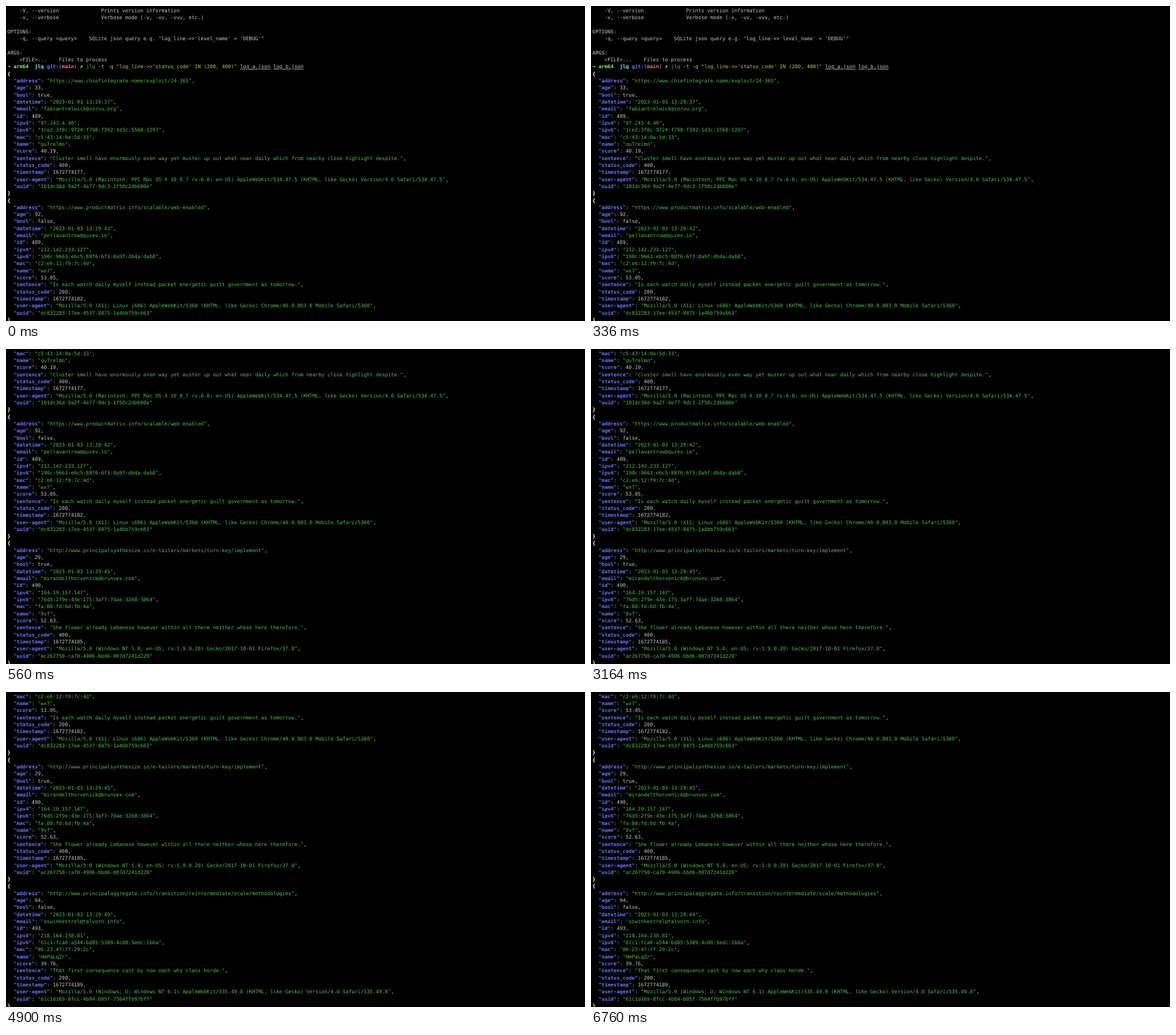
Animation of 1014 by 552 pixels, one loop 8 s. Source, as an HTML page:

```html
<!DOCTYPE html>
<html lang="en">
<meta charset="utf-8">
<title>jlq</title>
<style>
  html, body { margin: 0; width: 100%; height: 100%; overflow: hidden; background: #000; }
  svg { display: block; }
  text {
    font: 8.79px "DejaVu Sans Mono", monospace;
    text-rendering: geometricPrecision;
    white-space: pre;
    fill: #c9c9c9;
  }
  .key, .dir, .path, .branch, .brace, .mark { font-weight: bold; }
  .key { fill: #6e74fa; }
  .dir { fill: #7df57c; }
  .path { fill: #79fbfd; }
  .branch { fill: #ef766d; }
  .mark { fill: #fefb7e; }
  .brace { fill: #fff; }
  .string { fill: #55bf50; }
  .query { fill: #c9c54e; }
  .file { text-decoration: underline; }
</style>
<svg width="1014" height="552"><g id="screen"></g></svg>
<script>
const LEFT = 2.6, BASELINE = 10.7, CELL = 5.292, LINE = 12.326;
const LOOP = 8000, SCROLL_TIMES = [560, 4900], SCROLL_LINES = 18;
const screen = document.getElementById('screen');
const svg = name => document.createElementNS('http://www.w3.org/2000/svg', name);

const fields = ['address', 'age', 'bool', 'datetime', 'email', 'id', 'ipv4', 'ipv6', 'mac',
  'name', 'score', 'sentence', 'status_code', 'timestamp', 'user-agent', 'uuid'];

const records = [
  ['https://www.chiefintegrate.name/exploit/24-365', 33, true, '2023-01-03 13:29:37',
    'fabiantrelwick@zorvu.org', 489, '97.243.4.40', '1ce2:3f8c:9724:f798:f392:1d3c:5568:1297',
    'c5:43:14:0a:5d:33', 'quTrelmo', 40.19,
    'Cluster smell have enormously even way yet muster up out what near daily which from nearby close highlight despite.',
    400, 1672774177,
    'Mozilla/5.0 (Macintosh; PPC Mac OS X 10_8_7 rv:6.0; en-US) AppleWebKit/534.47.5 (KHTML, like Gecko) Version/4.0 Safari/534.47.5',
    '101dc36d-9a2f-4e77-9dc3-1f50c2db600e'],
  ['https://www.productmatrix.info/scalable/web-enabled', 92, false, '2023-01-03 13:29:42',
    'pellavantrow@quzev.io', 489, '212.142.233.127', '190c:9663:ebc5:88f6:6f3:8a9f:db4a:dab8',
    'c2:e6:12:f9:7c:4d', 'wx7', 53.05,
    'Is each watch daily myself instead packet energetic guilt government as tomorrow.',
    200, 1672774182,
    'Mozilla/5.0 (X11; Linux i686) AppleWebKit/5360 (KHTML, like Gecko) Chrome/40.0.803.0 Mobile Safari/5360',
    'dc832283-17ee-4537-8475-1a4bb759c663'],
  ['http://www.principalsynthesize.io/e-tailers/markets/turn-key/implement', 29, true, '2023-01-03 13:29:45',
    'mirandelthorvenick@brunvex.com', 490, '164.19.157.147', '76d5:2f9e:43e:175:3af7:7dae:3268:3864',
    'fa:88:fd:6d:fb:4a', '9vf', 52.63,
    'She flower already Lebanese however within all there neither whose here therefore.',
    400, 1672774185,
    'Mozilla/5.0 (Windows NT 5.0; en-US; rv:1.9.0.20) Gecko/2017-10-01 Firefox/37.0',
    'ac267750-ca70-4906-bbd6-007d7241d220'],
  ['http://www.principalaggregate.info/transition/reintermediate/scale/methodologies', 94, false, '2023-01-03 13:29:49',
    'oswinkestrel@talvorn.info', 493, '218.164.238.81', '61c1:fca0:a544:bd85:5389:4c00:5edc:1bba',
    '86:23:47:7f:29:2c', 'HmPaLqZr', 39.76,
    'That first consequence cast by now each why class horde.',
    200, 1672774189,
    'Mozilla/5.0 (Windows; U; Windows NT 6.1) AppleWebKit/535.49.8 (KHTML, like Gecko) Version/4.0 Safari/535.49.8',
    '61c1d169-8fcc-4b84-b05f-7564ffb97bff']
];

// Each line is a list of [text, class] runs.
const lines = [
  ...[
    '    -V, --version              Prints version information',
    '    -v, --verbose              Verbose mode (-v, -vv, -vvv, etc.)',
    '',
    'OPTIONS:',
    `    -q, --query <query>    SQLite json query e.g. "log_line->>'level_name' = 'DEBUG'"`,
    '',
    'ARGS:',
    '    <FILE>...    Files to process'
  ].map(text => [[text]]),
  [['➜ ', 'dir'], ['arm64  ', 'dir'], ['jlq ', 'path'], ['git:(', 'key'], ['main', 'branch'], [') ', 'key'],
    ['✗ ', 'mark'], ['jlq ', 'string'], ['-t -q '], [`"log_line->>'status_code' IN (200, 400)"`, 'query'],
    [' '], ['log_a.json', 'file'], [' '], ['log_b.json', 'file']],
  ...records.flatMap(record => [
    [['{', 'brace']],
    ...record.map((value, i) => [
      ['  '], [`"${fields[i]}"`, 'key'], [': '],
      [JSON.stringify(value), typeof value === 'string' ? 'string' : ''],
      [i < fields.length - 1 ? ',' : '']
    ]),
    [['}', 'brace']]
  ])
];

lines.forEach((runs, row) => {
  const line = svg('text');
  line.setAttribute('y', BASELINE + row * LINE);
  let column = 0;
  for (const [text, style = ''] of runs) {
    const run = svg('tspan');
    run.setAttribute('x', LEFT + column * CELL);
    run.setAttribute('class', style);
    run.textContent = text;
    line.append(run);
    column += text.length;
  }
  screen.append(line);
});

function draw() {
  const time = performance.now() % LOOP;
  const scrolls = SCROLL_TIMES.filter(start => time >= start).length;
  screen.setAttribute('transform', `translate(0 ${-scrolls * SCROLL_LINES * LINE})`);
  requestAnimationFrame(draw);
}
draw();
</script>
</html>
```
